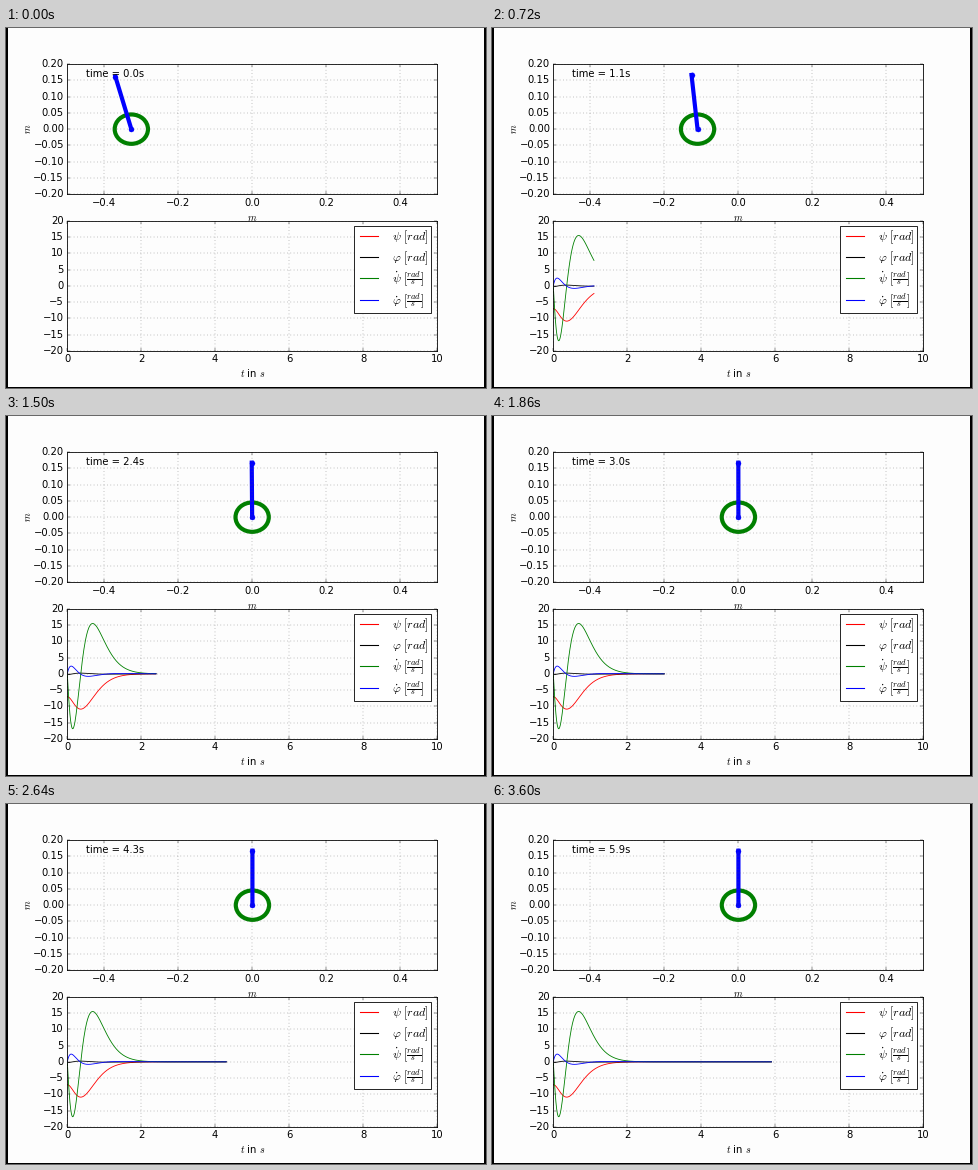
A matplotlib script that plays this animation: 480x360 px, repeating every 3660 ms.

```python
import numpy as np
import matplotlib.pyplot as plt
from matplotlib.animation import FuncAnimation
from matplotlib.patches import Circle, Rectangle

W, H, DPI = 480, 360, 60
BG = "#fdfdfd"
FRAMES, INTERVAL = 61, 60
RADIUS, ROD = 0.045, 0.167
DT = 0.01

plt.style.use("classic")
plt.rcParams.update({
    "savefig.dpi": "figure",
    "savefig.facecolor": BG,
    "font.sans-serif": ["DejaVu Sans"],
    "grid.color": "0.35",
})


def rate(t, gain, decay, z1, z2):
    """Damped angular velocity that is zero at t = 0, z1 and z2."""
    return gain * t * np.exp(-decay * t) * (1 - t / z1) * (1 - t / z2)


def integrate(v, start):
    steps = (v[1:] + v[:-1]) / 2 * DT
    return start + np.concatenate([[0], np.cumsum(steps)])


time = np.arange(0, 6, DT)
psi_dot = rate(time, -211, 5.774, 0.3627, -1 / 7.7)
phi_dot = rate(time, 57.4, 4.5, 0.35, 1.11)
psi = integrate(psi_dot, -7.0)
phi = integrate(phi_dot, -np.pi / 12)

fig = plt.figure(figsize=(W / DPI, H / DPI), dpi=DPI, facecolor=BG)


def make_axes(top, bottom, xlim, ylim, xticks, yticks):
    left, right = 61.3, 431
    ax = fig.add_axes([left / W, 1 - bottom / H, (right - left) / W, (bottom - top) / H],
                      facecolor=BG)
    ax.set(xlim=xlim, ylim=ylim, xticks=xticks, yticks=yticks)
    ax.grid(True)
    return ax


scene = make_axes(35.9, 166.4, (-0.5, 0.5), (-0.2, 0.2),
                  np.linspace(-0.4, 0.4, 5), np.linspace(-0.2, 0.2, 9))
scene.set_xlabel("$m$", labelpad=6)
scene.set_ylabel("$m$", labelpad=1)
wheel = scene.add_patch(Circle((0, 0), RADIUS, fill=False, ec="g", lw=5))
rod, = scene.plot([], [], "b-o", lw=5, ms=6, mec="b")
clock = scene.text(0.05, 0.9, "", transform=scene.transAxes)

chart = make_axes(192.6, 323.1, (0, 10), (-20, 20),
                  range(0, 11, 2), range(-20, 21, 5))
chart.set_xlabel("$t$ in $s$", labelpad=3.2)
series = [
    (psi, "r", r"$\psi\ [rad]$"),
    (phi, "k", r"$\varphi\ [rad]$"),
    (psi_dot, "g", r"$\dot{\psi}\ [\frac{rad}{s}]$"),
    (phi_dot, "b", r"$\dot{\varphi}\ [\frac{rad}{s}]$"),
]
curves = [chart.plot([], [], color, lw=1, label=label)[0] for _, color, label in series]
legend = chart.legend(loc="upper right", numpoints=2, labelspacing=0.22, borderpad=0.22,
                      handlelength=2.05, handletextpad=0.9, borderaxespad=0.47)
for line in legend.get_lines():
    line.set_linewidth(1.3)

# thin black frame at the left, right and bottom edges
for x, y, w, h in [(0, 0, 2, H), (W - 2, 0, 2, H), (0, 0, W, 1)]:
    fig.add_artist(Rectangle((x / W, y / H), w / W, h / H, fc="k", ec="none"))


def update(i):
    step = max(0, i - 1)
    n = step * 10
    x = RADIUS * (psi[n] + phi[n])
    wheel.center = (x, 0)
    rod.set_data([x, x + ROD * np.sin(phi[n])], [0, ROD * np.cos(phi[n])])
    clock.set_text(f"time = {step / 10:.1f}s")
    for curve, (values, _, _) in zip(curves, series):
        curve.set_data(time[:n + 1], values[:n + 1])
    return [wheel, rod, clock, *curves]


anim = FuncAnimation(fig, update, frames=FRAMES, interval=INTERVAL,
                     repeat=True, repeat_delay=0, blit=False)
plt.show()
```
